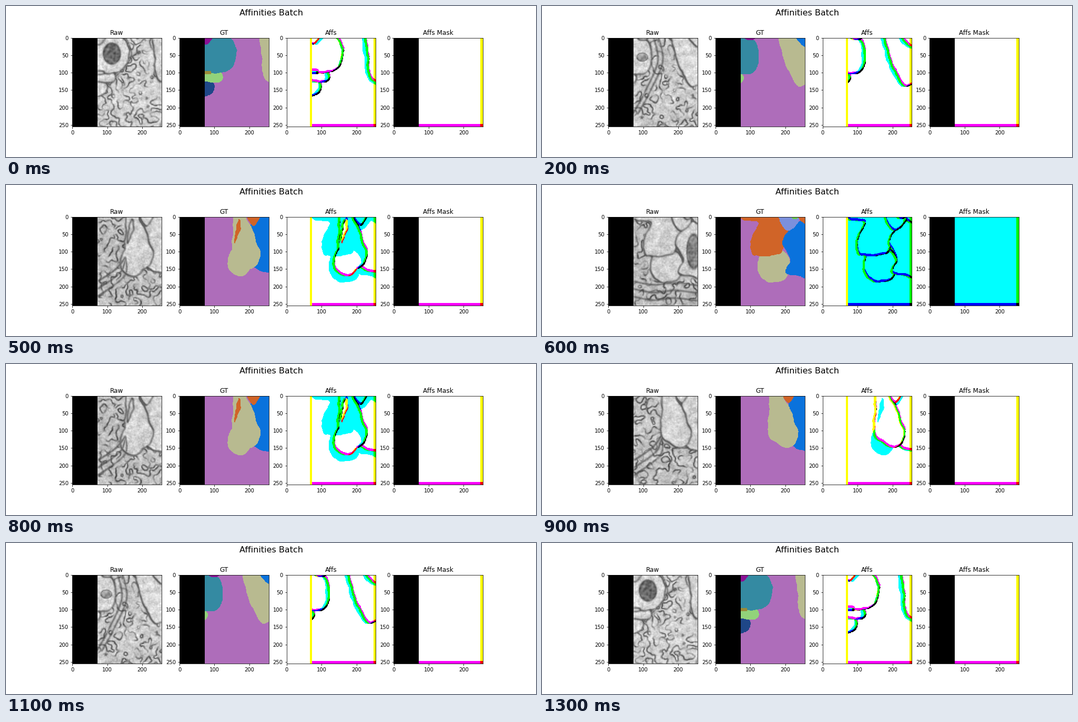
Recreate the animation shown at these times as a matplotlib script. Size 1008 px wide and 288 px high, loop 1.4 s.

```python
import numpy as np
import matplotlib.pyplot as plt
from matplotlib.animation import FuncAnimation
from matplotlib.path import Path

N = 256       # image side
PAD = 73      # width of the empty left part
MASK_PAD = 72
STEP = 7      # neighbour distance of the affinities
SLICES = 7

COLORS = dict(empty="#000000", purple="#ae6dba", teal="#348aa2",
              plum="#8a1193", olive="#998b3a", green="#92d37a",
              navy="#1f4788", beige="#b8ba90", blue="#0a72dc",
              orange="#d06428", sky="#7c90dc", lime="#6ccb4a")
NAMES = list(COLORS)
PALETTE = np.array([plt.matplotlib.colors.to_rgb(c) for c in COLORS.values()])

yy, xx = np.mgrid[:N, :N].astype(float)
freq = np.fft.fftfreq(N)
FREQ2 = freq[:, None] ** 2 + freq[None, :] ** 2


def blur(img, sigma):
    kernel = np.exp(-2 * np.pi ** 2 * sigma ** 2 * FREQ2)
    return np.fft.ifft2(np.fft.fft2(img) * kernel).real


def noise(rng, sigma):
    n = blur(rng.standard_normal((N, N)), sigma)
    return n / n.std()


def smooth(pts, closed, n):
    """Catmull-Rom curve through the key points."""
    q = np.pad(np.array(pts, float), ((1, 2 if closed else 1), (0, 0)),
               "wrap" if closed else "edge")
    a, b, c, d = (q[i:len(q) - 3 + i, None] for i in range(4))
    t = np.linspace(0, 1, n)[None, :, None]
    curve = b + t / 2 * (c - a + t * (2 * a - 5 * b + 4 * c - d
                                      + t * (3 * (b - c) + d - a)))
    return curve.reshape(-1, 2)


# ---- segmentation: a shape is a test on coordinates ------------------------

def blob(cx, cy, rx, ry, p=2.0):
    return lambda x, y: abs((x - cx) / rx) ** p + abs((y - cy) / ry) ** p < 1


def outline(*pts):
    path = Path(smooth(pts, True, 12))
    return lambda x, y: path.contains_points(
        np.column_stack([x.ravel(), y.ravel()])).reshape(x.shape)


def move(shape, dx, dy=0):
    return lambda x, y: shape(x - dx, y - dy)


def squeeze(shape, x0, k):
    return lambda x, y: shape(x0 + (x - x0) / k, y)


warp_rng = np.random.default_rng(3)
warp_x = xx + .8 * noise(warp_rng, 5)
warp_y = yy + .8 * noise(warp_rng, 5)


def rasterize(shapes):
    seg = np.full((N, N), NAMES.index("purple"))
    for name, shape in shapes:
        seg[shape(warp_x, warp_y)] = NAMES.index(name)
    seg[:, :PAD] = NAMES.index("empty")
    return seg


teal_a = blob(96, 45, 66, 58, 2.5)
plum_a = blob(73, 0, 23, 20, 1.3)
green_a = blob(94, 112, 30, 18, 2.2)
navy_a = blob(66, 142, 34, 28)
olive_a = blob(73, 100, 19, 5, 6)
beige_a = outline((232, -20), (236, 60), (238, 102), (256, 128), (300, 140),
                  (300, -20))

teal_b = blob(85, 52, 38, 53, 2.8)
plum_b = blob(98, 0, 15, 7)
green_b = blob(70, 118, 10, 15)
beige_b = outline((187, -20), (192, 52), (216, 110), (234, 137), (253, 138),
                  (290, 110), (290, -20))
blue_b = blob(270, -20, 45, 48)

beige_c = outline((156, -20), (153, 45), (150, 112), (177, 138), (207, 150),
                  (227, 139), (237, 105), (225, 75), (216, 41), (196, 7),
                  (190, -20))
blue_c = blob(270, 70, 64, 88, 3)
orange_c = blob(209, -6, 18, 28, 1.3)
foot = blob(172, 128, 34, 42, 2.2)
patch = outline((172, 7), (173, 35), (158, 76), (161, 30))

beige_d = blob(166, 140, 46, 49, 2.3)
orange_d = outline((73, -15), (80, 10), (121, 14), (116, 34), (101, 72),
                   (110, 111), (174, 109), (195, 90), (215, 40), (190, -15))
blue_d = outline((290, 30), (245, 11), (210, 41), (190, 72), (203, 99),
                 (212, 127), (201, 160), (240, 171), (290, 172))

stacks = [
    [("navy", navy_a), ("green", green_a), ("teal", teal_a),
     ("olive", olive_a), ("plum", plum_a), ("beige", beige_a)],
    [("navy", move(navy_a, -10, -5)), ("green", move(green_a, -14)),
     ("teal", move(teal_a, -7)), ("plum", move(plum_a, 10)),
     ("beige", move(beige_a, -14))],
    [("green", green_b), ("teal", teal_b), ("plum", plum_b),
     ("beige", beige_b), ("blue", blue_b)],
    [("teal", move(teal_b, -12, -3)), ("plum", move(plum_b, -8, -2)),
     ("beige", move(beige_b, -14)), ("blue", move(blue_b, -12, 3))],
    [("blue", blue_c), ("beige", beige_c), ("orange", orange_c)],
    [("blue", move(blue_c, -6, 2)), ("beige", squeeze(beige_c, 150, .93)),
     ("beige", foot), ("orange", move(orange_c, 3, 6)), ("orange", patch)],
    [("beige", beige_d), ("orange", orange_d), ("blue", blue_d),
     ("sky", blob(210, 0, 29, 41, 1.6)), ("lime", blob(226, 0, 11, 8)),
     ("orange", blob(265, -10, 32, 31))],
]
segs = [rasterize(s) for s in stacks]


# ---- affinities and mask ---------------------------------------------------

def affinities(z):
    seg = segs[z]
    aff = np.ones((N, N, 3))
    if z + 1 < SLICES:
        aff[..., 0] = seg == segs[z + 1]
    else:
        aff[:, PAD:, 0] = 0
    aff[:-STEP, :, 1] = seg[:-STEP] == seg[STEP:]
    aff[-STEP:, PAD:, 1] = 0
    aff[:, :-STEP, 2] = seg[:, :-STEP] == seg[:, STEP:]
    aff[:, -STEP:, 2] = 0
    return aff


def aff_mask(z):
    mask = np.ones((N, N, 3))
    if z + 1 == SLICES:
        mask[..., 0] = 0
    mask[-STEP:, :, 1] = 0
    mask[:, -STEP:, 2] = 0
    mask[:, :MASK_PAD] = 0
    return mask


# ---- grey tissue -----------------------------------------------------------

def wiggles(rng, sigma, width):
    """Broken soft lines along the zero level of smooth noise."""
    n = noise(rng, sigma)
    gy, gx = np.gradient(n)
    dist = np.abs(n) / (np.hypot(gx, gy) + 1e-3)
    gaps = np.clip(.8 + .5 * noise(rng, 8), 0, 1)
    return np.exp(-(dist / width) ** 2) * gaps


def stroke(pts, width=2.2):
    curve = np.rint(smooth(pts, False, 150)).astype(int).clip(0, N - 1)
    line = np.zeros((N, N))
    line[curve[:, 1], curve[:, 0]] = 1
    return np.clip(blur(line, width) * width * 2.2, 0, 1)


def borders(seg):
    edge = np.zeros((N, N))
    edge[:, PAD + 1:] = seg[:, PAD + 1:] != seg[:, PAD:-1]
    edge[1:] = np.maximum(edge[1:], seg[1:] != seg[:-1])
    return np.clip(blur(edge, 2.2) * 4.2, 0, 1)


def membranes(z):
    """Long strands that belong to no labelled border."""
    if z < 2:
        return [[(152, 0), (168, 55), (122, 114)]]
    if z < 4:
        return [[(130 + d, 0), (141 + d, 70), (104 + d, 157), (70 + d, 220)]
                for d in (0, 14)]
    if z < 6:
        return [[(152, 116), (125 + 12 * k, 150 + 10 * k), (74, 185 + 22 * k)]
                for k in range(3)]
    return [[(73, y), (130, y + 10), (190, y + 4), (256, y + 12)]
            for y in (186, 208, 230)]


def organelle(z):
    if z < 2:
        return 113 - 4 * z, 46, 25, 31, .42
    if z < 4:
        return 97, 56, 16, 13, .6
    return (244, 100, 20, 50, .5) if z == SLICES - 1 else None


def tissue(z):
    rng = np.random.default_rng(40 + z)
    seg = segs[z]
    depth = z / (SLICES - 1)
    cell, tone = .86 - .04 * depth, .83 - .09 * depth
    outside = blur((seg == NAMES.index("purple")).astype(float), 2).clip(0, 1)
    img = cell + (tone - cell) * outside
    img -= .4 * wiggles(rng, 5.2, 2.8) * (.12 + .88 * outside)
    img += .03 * noise(rng, 1.5) + .03 * noise(rng, 5)
    body = organelle(z)
    if body:
        cx, cy, rx, ry, grey = body
        r = np.hypot((xx - cx) / rx, (yy - cy) / ry)
        inside = 1 / (1 + np.exp((r - 1) * 20))
        img += inside * (grey - img + .06 * noise(rng, 2.5))
        img -= .16 * np.exp(-((r - .97) / .1) ** 2)
    dark = borders(seg)
    for pts in membranes(z):
        dark = np.maximum(dark, .8 * stroke(pts))
    img -= dark * (img - .3) * .85
    img[:, :PAD] = 0
    return img.clip(0, 1)


# ---- figure ----------------------------------------------------------------

panels = [("Raw", [tissue(z) for z in range(SLICES)]),
          ("GT", [PALETTE[s] for s in segs]),
          ("Affs", [affinities(z) for z in range(SLICES)]),
          ("Affs Mask", [aff_mask(z) for z in range(SLICES)])]

fig, axes = plt.subplots(1, 4, figsize=(14, 4), dpi=72)
fig.suptitle("Affinities Batch", fontsize=16)
images = []
for ax, (title, stack) in zip(axes, panels):
    images.append(ax.imshow(stack[0], cmap="gray", vmin=0, vmax=1,
                            interpolation="nearest"))
    ax.set_title(title)
    ax.set_xticks(range(0, 201, 100))
    ax.set_yticks(range(0, 251, 50))


def update(i):
    z = min(i, 2 * SLICES - 1 - i)  # down the stack and back up
    for image, (_, stack) in zip(images, panels):
        image.set_data(stack[z])
    return images


anim = FuncAnimation(fig, update, frames=2 * SLICES, interval=100, repeat=True)
plt.show()
```
